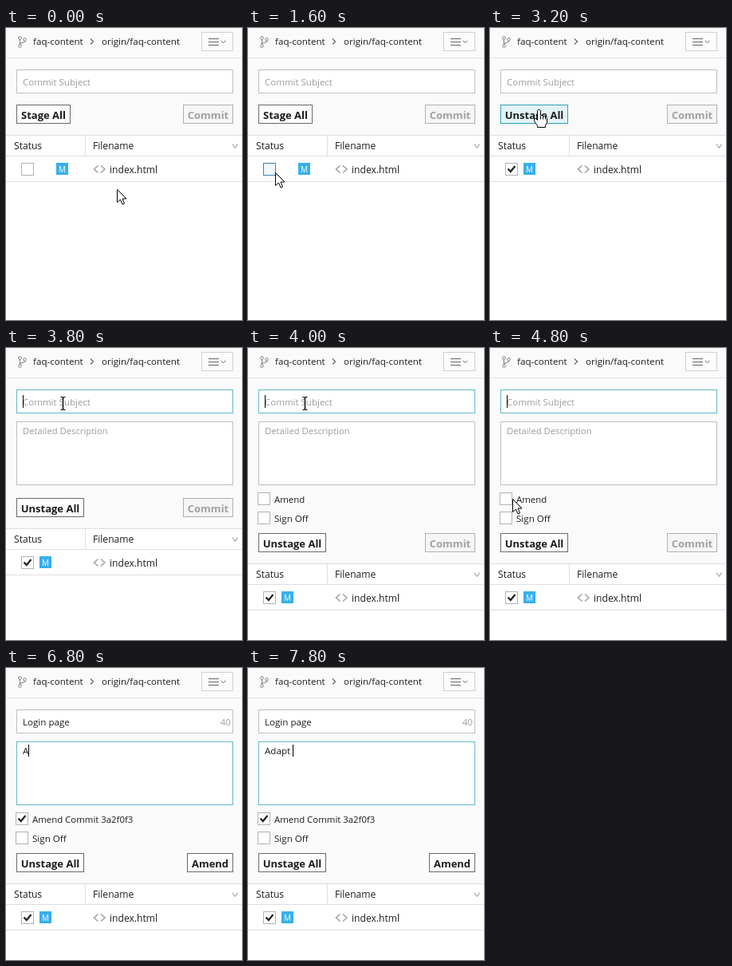
These frames come from a looping animation (296 by 366 pixels, 8000 ms). An HTML page with a canvas:

```html
<!DOCTYPE html>
<html lang="en">
<head>
<meta charset="utf-8">
<title>Amend a commit</title>
<style>
html, body { margin: 0; width: 100%; height: 100%; overflow: hidden; background: #fff; }
canvas { display: block; }
</style>
</head>
<body>
<canvas id="stage" width="296" height="366"></canvas>
<script>
const ctx = document.getElementById('stage').getContext('2d');
const LOOP = 8000, STEP = 200;
const FAMILY = '"Open Sans", "Noto Sans", sans-serif';
const INK = '#1c1c1c', HINT = '#9c9c9c', FOCUS = '#62b9cd';

// Pointer path: time, x, y, shape
const path = [
  [0, 139, 202, 'arrow'], [800, 139, 202, 'arrow'],
  [1600, 34, 181, 'arrow'], [2800, 34, 181, 'arrow'],
  [3000, 45, 146, 'arrow'], [3200, 61, 102, 'hand'],
  [3400, 71, 69, 'beam'], [4200, 71, 69, 'beam'],
  [4600, 42, 150, 'beam'], [4800, 28, 189, 'arrow'],
  [5000, 23, 190, 'arrow'], [5600, 23, 190, 'arrow'],
  [5800, 32, 158, 'beam'], [6000, 41, 124, 'beam'],
  [6800, 41, 124, 'beam']
];

const clamp = v => Math.max(0, Math.min(1, v));
const ease = v => v * v * (3 - 2 * v);

function pointerAt(t) {
  if (t >= 6800) return null;
  let i = 0;
  while (i < path.length - 2 && t >= path[i + 1][0]) i++;
  const a = path[i], b = path[i + 1];
  const k = ease(clamp((t - a[0]) / (b[0] - a[0])));
  return {
    x: Math.round(a[1] + (b[1] - a[1]) * k),
    y: Math.round(a[2] + (b[2] - a[2]) * k),
    shape: k === 1 ? b[3] : a[3]
  };
}

function fill(x, y, w, h, color) {
  ctx.fillStyle = color;
  ctx.fillRect(x, y, w, h);
}

function frame(x, y, w, h, border, back = '#fff') {
  fill(x, y, w, h, border);
  fill(x + 1, y + 1, w - 2, h - 2, back);
}

function label(str, x, y, size = 11.6, color = INK, weight = 400, align = 'left') {
  ctx.font = `${weight} ${size}px ${FAMILY}`;
  ctx.fillStyle = color;
  ctx.textAlign = align;
  ctx.fillText(str, x, y);
  return ctx.measureText(str).width;
}

function line(points, color, width = 1) {
  ctx.beginPath();
  points.forEach(([x, y]) => ctx.lineTo(x, y));
  ctx.strokeStyle = color;
  ctx.lineWidth = width;
  ctx.stroke();
}

function shape(points) {
  ctx.beginPath();
  points.forEach(([x, y]) => ctx.lineTo(x, y));
  ctx.closePath();
  ctx.fillStyle = '#fff';
  ctx.fill();
  ctx.strokeStyle = '#000';
  ctx.lineWidth = 1;
  ctx.stroke();
}

function checkbox(x, y, on, hover) {
  frame(x, y, 16, 16, hover ? '#3c7fb1' : '#b2b2b2', hover ? '#f0f7fd' : '#fff');
  if (on) line([[x + 3.5, y + 7.5], [x + 6.8, y + 11], [x + 12.5, y + 4]], '#222', 2.2);
}

function button(str, x, y, w, state) {
  const [border, back, ink] = {
    normal: ['#6a6a6a', '#fdfdfd', INK],
    hover: ['#2ea3b5', '#e3f3f8', INK],
    off: ['#b0b0b0', '#f5f5f5', '#a0a0a0']
  }[state];
  frame(x, y, w, 24, border, back);
  label(str, x + w / 2, y + 18, 13, ink, 700, 'center');
}

function branchIcon() {
  const c = '#7b7b7b';
  line([[17.5, 14], [17.5, 21]], c);
  line([[23.5, 16], [23.5, 17.5], [17.5, 19.5]], c);
  for (const [x, y] of [[17.5, 12.5], [23.5, 14.5], [17.5, 22.5]]) {
    ctx.beginPath();
    ctx.arc(x, y, 1.8, 0, Math.PI * 2);
    ctx.fillStyle = '#fafafa';
    ctx.fill();
    ctx.stroke();
  }
}

function header() {
  branchIcon();
  label('faq-content', 34, 21);
  line([[106, 13.5], [109.5, 17], [106, 20.5]], '#666', 1.2);
  label('origin/faq-content', 120, 21);
  frame(245, 5, 40, 24, '#d0d0d0', '#fcfcfc');
  for (const y of [13, 17, 21]) fill(254, y, 13, 1, '#666');
  line([[269.5, 16], [272.5, 18.5], [275.5, 16]], '#666');
  fill(0, 37, 296, 1, '#e4e4e4');
}

function fileList(dy, checked, staged, hover) {
  ctx.save();
  ctx.translate(0, dy);
  fill(0, 134, 296, 232, '#fff');
  for (const y of [134, 160, 192]) fill(0, y, 296, 1, '#dedede');
  fill(99, 135, 1, 25, '#dedede');
  label('Status', 10, 152, 12.1);
  label('Filename', 109, 152, 12.1);
  line([[284, 145.5], [287.3, 150.5], [290.5, 145.5]], '#888');
  checkbox(19, 169, checked, hover);
  const x = staged ? 42 : 63;
  fill(x, 169, 15, 15, '#37b0ec');
  label('M', x + 7.5, 180.5, 10, '#fff', 400, 'center');
  line([[115.5, 172.5], [110.5, 177], [115.5, 181.5]], '#a0a0a0', 1.5);
  line([[119, 172.5], [124, 177], [119, 181.5]], '#a0a0a0', 1.5);
  label('index.html', 130, 181.5, 12.1);
  ctx.restore();
}

function subject(t) {
  const focus = t >= 3600 && t < 5200;
  frame(13, 52, 272, 30, focus ? FOCUS : '#c0c0c0');
  if (t >= 5400) {
    label('Login page', 21, 72);
    label('40', 282, 72, 11.6, '#98a2a2', 400, 'right');
  } else {
    label('Commit Subject', 21, 72, 11.5, HINT);
  }
  if (focus) fill(21, 59, 1, 16, '#000');
}

function description(t, h) {
  if (h < 3) return;
  const typed = 'Adapt '.slice(0, Math.max(0, Math.floor((t - 6600) / STEP)));
  ctx.save();
  ctx.beginPath();
  ctx.rect(13, 92, 272, h);
  ctx.clip();
  frame(13, 92, 272, h, t >= 6200 ? FOCUS : '#c0c0c0');
  let w = 0;
  if (typed) w = label(typed, 21, 108);
  else label('Detailed Description', 21, 108, 11.25, HINT);
  if (t >= 6400) fill(Math.round(21 + w), 96, 1, 15, '#000');
  ctx.restore();
}

function options(t) {
  const on = t >= 5200;
  checkbox(12, 181, on, t >= 5000 && t < 5800);
  label(t >= 5400 ? 'Amend Commit 3a2f0f3' : 'Amend', 33, 193.5, 11.4);
  checkbox(12, 205, false, false);
  label('Sign Off', 33, 217.5, 11.6);
}

function pointer({ x, y, shape: kind }) {
  ctx.save();
  ctx.translate(x + 0.5, y + 0.5);
  if (kind === 'arrow') {
    shape([[0, 0], [0, 16], [4, 12.5], [6.5, 18.5], [9, 17.5], [6.5, 11.5], [11.5, 11.5]]);
  } else if (kind === 'beam') {
    line([[-3, -8], [-1, -8], [0, -7], [0, 7], [-1, 8], [-3, 8]], '#000', 1.2);
    line([[3, -8], [1, -8], [0, -7], [0, 7], [1, 8], [3, 8]], '#000', 1.2);
  } else {
    shape([[-1, 0], [1, 0], [2, 1], [2, 7], [4, 7], [5, 8], [7, 8], [8, 9], [9, 9], [10, 11],
      [10, 16], [8, 20], [8, 22], [-2, 22], [-2, 20], [-6, 14], [-6, 11], [-4, 11], [-2, 13], [-2, 1]]);
    for (const k of [2, 5, 8]) line([[k, 8], [k, 12]], '#000');
  }
  ctx.restore();
}

function draw(time) {
  const t = Math.floor((time % LOOP) / STEP) * STEP;
  const detail = Math.round(92 * clamp((t - 3400) / 400));
  const extra = Math.round(44 * clamp((t - 3800) / 200));
  const dy = detail + extra;
  const staged = t >= 2400;

  fill(0, 0, 296, 366, '#fafafa');
  header();
  subject(t);
  description(t, detail - 12);
  if (extra) options(t);

  if (staged) button('Unstage All', 13, 96 + dy, 85, t === 3200 ? 'hover' : 'normal');
  else button('Stage All', 13, 96, 68, 'normal');
  if (t >= 5400) button('Amend', 227, 96 + dy, 58, 'normal');
  else button('Commit', 222, 96 + dy, 63, t >= 5200 ? 'normal' : 'off');

  fileList(dy, t >= 2200, staged, t >= 1600 && t < 3000);
  const p = pointerAt(t);
  if (p) pointer(p);
}

const start = performance.now();
function tick() {
  draw(performance.now() - start);
  requestAnimationFrame(tick);
}
tick();
</script>
</body>
</html>
```
